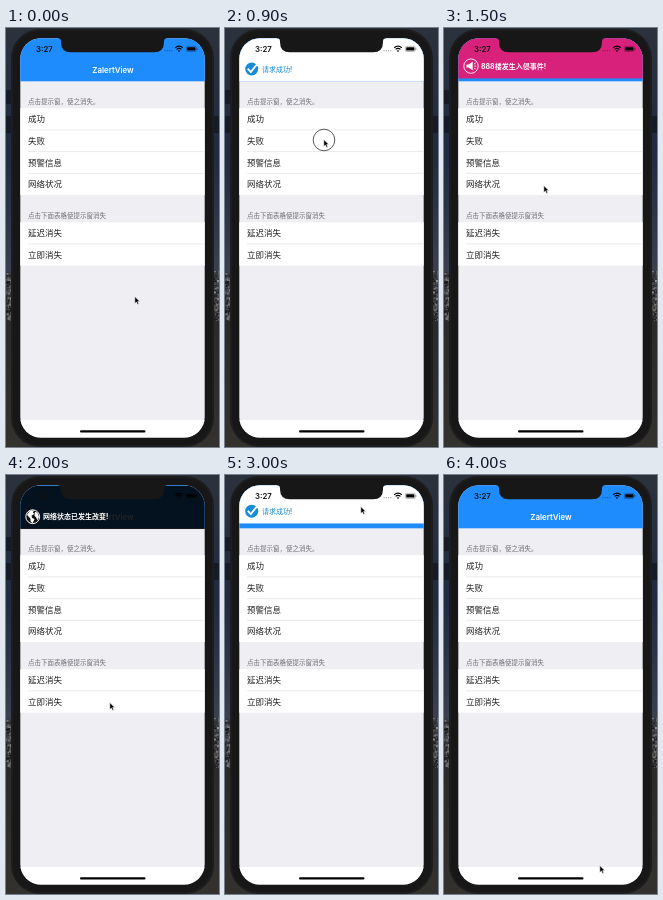
An HTML page for the animation above (4100 ms loop, 213 by 419 pixels).

```html
<!DOCTYPE html>
<html lang="zh-CN">
<head>
<meta charset="utf-8">
<style>
html, body { margin: 0; width: 100%; height: 100%; overflow: hidden; background: #15171c; }
svg { display: block; width: 213px; height: 419px; }
text { font-family: Inter, "Noto Sans CJK SC", "Noto Sans CJK", sans-serif; }
.head { font-size: 6.5px; fill: #6d6d72; }
.row { font-size: 8.5px; fill: #222; }
.note { font-size: 7px; font-weight: 700; fill: #fff; }
</style>
</head>
<body>
<svg viewBox="0 0 213 419">
  <defs>
    <linearGradient id="sky" x2="0" y2="1">
      <stop offset="0" stop-color="#2b323c"/>
      <stop offset=".3" stop-color="#1f2b42"/>
      <stop offset=".58" stop-color="#3a404e"/>
      <stop offset=".7" stop-color="#2a2a2a"/>
      <stop offset="1" stop-color="#33322f"/>
    </linearGradient>
    <clipPath id="screen"><rect x="14.300" y="10.300" width="184.400" height="399.200" rx="20.500"/></clipPath>
  </defs>

  <rect width="213" height="419" fill="url(#sky)"/>
  <g id="rocks"></g>
  <path d="M0 62h6v14H0zM0 88h6v17H0zM207 88h6v17h-6z" fill="#151b27"/>
  <rect x="5" y="1" width="203" height="418" rx="29" fill="#1d1d1d"/>
  <rect x="7" y="3" width="199" height="414" rx="27" fill="#171717"/>

  <g clip-path="url(#screen)">
    <rect x="14" y="10" width="185" height="400" fill="#eeeef3"/>
    <rect x="14" y="10" width="185" height="43.3" fill="#1e8cfc"/>
    <text x="107" y="45.4" text-anchor="middle" font-size="7.9" font-weight="600" fill="#fff">ZalertView</text>
    <g id="list"></g>
    <rect x="14" y="392" width="185" height="18" fill="#fff"/>
    <rect x="74" y="402.3" width="65.500" height="2.200" rx="1.1"/>

    <g class="banner">
      <rect x="14" y="10" width="185" height="43.3" fill="#fff"/>
      <circle cx="26.700" cy="41" r="6.500" fill="#168bd8"/>
      <path d="M22.800 40.700l3 3.300 6-7.500" fill="none" stroke="#fff" stroke-width="1.900"/>
      <text class="note" x="37" y="43.600" style="fill:#168bd8;font-weight:500">请求成功!</text>
    </g>
    <g class="banner">
      <rect x="14" y="10" width="185" height="43.3" fill="#ee4b45"/>
      <circle cx="26.700" cy="41" r="6.500" fill="none" stroke="#fff"/>
      <path d="M24 38.300l5.400 5.400m0-5.400l-5.400 5.400" stroke="#fff" stroke-width="1.400"/>
      <text class="note" x="37" y="43.600">请求失败!</text>
    </g>
    <g class="banner">
      <rect x="14" y="10" width="185" height="43.3" fill="#d8217b"/>
      <circle cx="27" cy="41" r="7.200" fill="none" stroke="#fff" stroke-width=".9"/>
      <path d="M22.500 39.500h2.200l4-3v9l-4-3h-2.200z" fill="#fff"/>
      <path d="M30 39l1.700-1M30.200 41h2M30 43l1.700 1" stroke="#fff" stroke-width=".8"/>
      <text class="note" x="37" y="43.600">888楼发生入侵事件!</text>
    </g>
    <g class="banner">
      <rect x="14" y="10" width="185" height="43.3" fill="#000" opacity=".87"/>
      <circle cx="26.700" cy="41" r="6.900" fill="#111" stroke="#fff" stroke-width="1"/>
      <path d="M21 39l3-4 4-.5-1 2.500 1.500 1-3 2 .5 2 2.500 1.500-2 4-2-2v-2.500zM29 36l2.500 1 1.500 4-1.500 3.500-1.500-3-1.500-1.500z" fill="#fff"/>
      <text class="note" x="37" y="43.600">网络状态已发生改变!</text>
    </g>

    <text x="30" y="24" font-size="7.800" font-weight="600" fill="#111">3:27</text>
    <path d="M158.500 22.800h8" stroke="#000" stroke-opacity=".4" stroke-width="1.100" stroke-dasharray="1.200 1"/>
    <path d="M169.200 19.700q3.800-3.300 7.600 0M170.600 21.400q2.400-2 4.800 0" fill="none" stroke="#000" stroke-width="1.200"/>
    <path d="M171.700 22.700q1.300-1 2.600 0l-1.300 1.400z"/>
    <rect x="180.300" y="18.300" width="10" height="5.200" rx="1.500" fill="none" stroke="#000" stroke-opacity=".45" stroke-width=".6"/>
    <rect x="181.200" y="19.200" width="8.200" height="3.400" rx=".7"/>
    <path d="M191 20v1.800" stroke="#000" stroke-opacity=".5" stroke-width=".7"/>
  </g>
  <path d="M52 9h109v1.300q-3 0-3 3v1q0 10-10 10H65q-10 0-10-10v-1q0-3-3-3z" fill="#171717"/>

  <g id="cursor">
    <circle id="ring" r="10.800" fill="none" stroke="#333" stroke-width=".8"/>
    <path d="M0 0v7.700l1.800-1.600 1.300 2.800 1.400-.6-1.300-2.800h2.400z" transform="translate(-.2 -.4) scale(.9)" stroke="#fff" stroke-width=".6"/>
  </g>
</svg>
<script>
const LOOP = 4100, STEP = 100, ROW = 21.7;
const $ = id => document.getElementById(id);

function section(top, title, rows) {
  let out = `<text class="head" x="22" y="${top - 4.7}">${title}</text>
    <rect x="14" y="${top}" width="185" height="${ROW * rows.length}" fill="#fff"/>`;
  rows.forEach((label, i) => {
    const y = top + ROW * i;
    out += `<text class="row" x="22" y="${y + 14}">${label}</text>`;
    if (i) out += `<path d="M22 ${y}H199" stroke="#dcdce0" stroke-width=".6"/>`;
  });
  return out;
}
$('list').innerHTML =
  section(80.2, '点击提示窗，使之消失。', ['成功', '失败', '预警信息', '网络状况']) +
  section(194.2, '点击下面表格使提示窗消失', ['延迟消失', '立即消失']);

// Speckled mountains on both sides of the phone
let seed = 7;
const random = () => (seed = seed * 16807 % 2147483647) / 2147483647;
let rocks = '';
for (let i = 0; i < 260; i++) {
  const x = random() * 6 + (i % 2 ? 207 : -1), y = 243 + random() * 48;
  const grey = 20 + 130 * random() ** 1.5;
  rocks += `<rect x="${x}" y="${y}" width="${1 + random() * 2}" height="${1 + random() * 2}" fill="rgb(${grey},${grey},${grey})"/>`;
}
$('rocks').innerHTML = rocks;

// [banner, shown at, dismissed at]
const shows = [[0, 560, 910], [1, 910, 1230], [2, 1230, 1600], [3, 1630, 2120], [0, 2760, 3400]];
const taps = [500, 900, 1200, 1600, 2100, 2700, 3400];
// [time, x, y]
const path = [
  [0, 129, 269], [400, 100, 91], [550, 99, 91], [800, 99, 112], [950, 99, 112],
  [1150, 100, 134], [1250, 100, 134], [1450, 100, 158], [1650, 100, 158],
  [1950, 104, 228], [2150, 104, 228], [2600, 101, 133], [2700, 101, 91],
  [2780, 101, 91], [3000, 136, 32], [3500, 137, 36], [4000, 156, 391], [4100, 156, 391]
];
const banners = [...document.querySelectorAll('.banner')];

const spring = t => -45 * Math.exp(-t / 170) * Math.cos(t / 216);

function cursorAt(t) {
  const i = path.findIndex(p => p[0] > t), [a, b] = [path[i - 1], path[i]];
  const k = (t - a[0]) / (b[0] - a[0]), e = k * k * (3 - 2 * k);
  return [a[1] + (b[1] - a[1]) * e, a[2] + (b[2] - a[2]) * e];
}

function draw(t) {
  for (const b of banners) b.style.display = 'none';
  for (const [id, start, end] of shows) {
    if (t < start || t > end + 200) continue;
    const leave = Math.max(0, t - end) / 200;
    banners[id].style.display = '';
    banners[id].setAttribute('transform', `translate(0 ${spring(t - start) - 45 * leave * leave})`);
  }
  $('cursor').setAttribute('transform', `translate(${cursorAt(t)})`);
  $('ring').style.display = taps.some(s => t >= s && t < s + STEP) ? '' : 'none';
}

function tick() {
  draw(Math.floor(performance.now() % LOOP / STEP) * STEP);
  requestAnimationFrame(tick);
}
tick();
</script>
</body>
</html>
```
